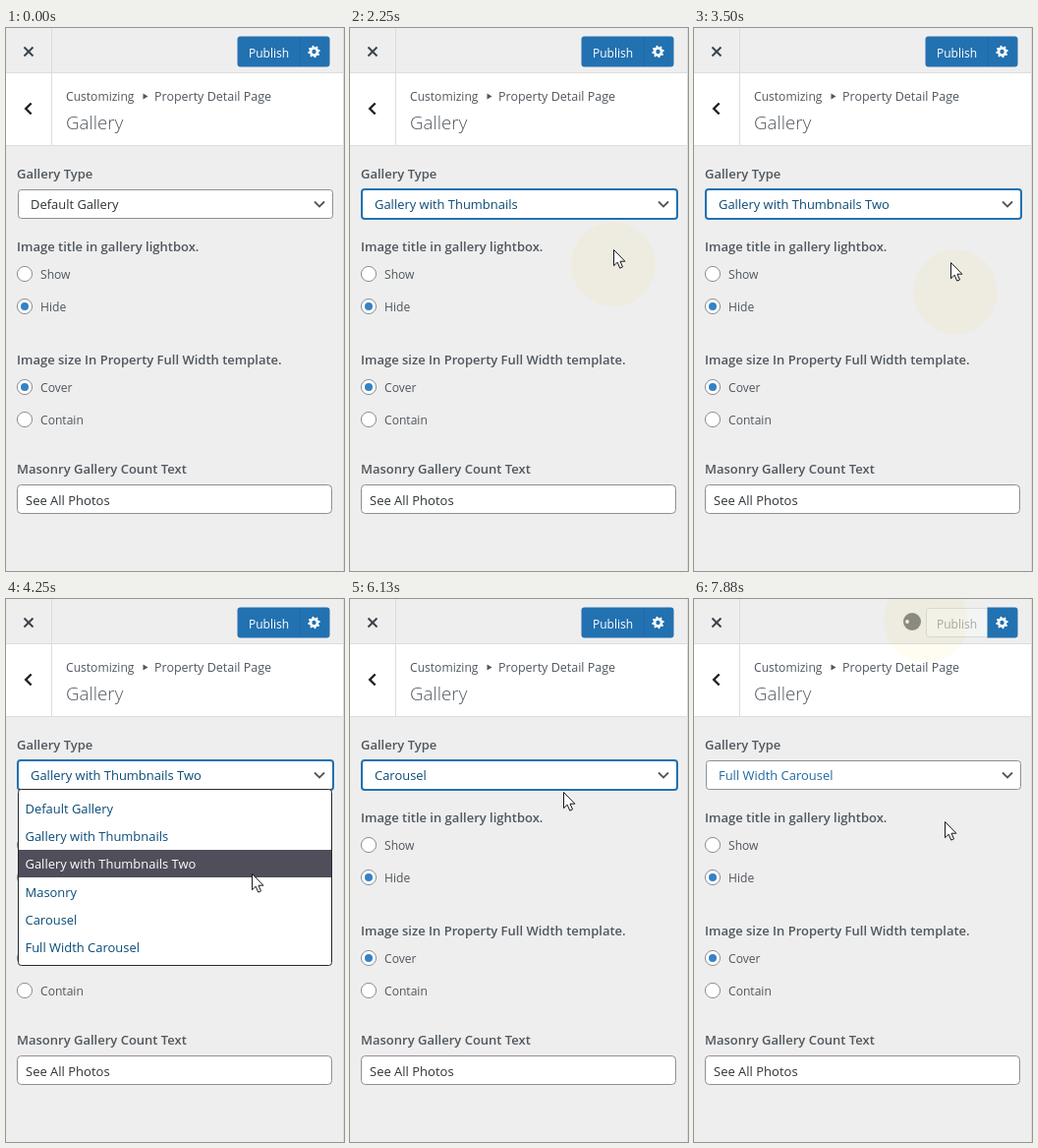
An HTML page with a canvas that plays this animation: 344 px wide and 552 px high, repeating every 8 s.

```html
<!DOCTYPE html>
<html lang="en">
<head>
<meta charset="utf-8">
<title>Gallery settings</title>
<style>
html, body { margin: 0; width: 100%; height: 100%; overflow: hidden; background: #eee; }
canvas { display: block; }
</style>
</head>
<body>
<canvas id="stage" width="344" height="552"></canvas>
<script>
const c = document.getElementById('stage').getContext('2d');
const LOOP = 8000, STEP = 125, GLOW = 375, ROW = 28.2;
const BLUE = '#2271b1', INK = '#2c3338', LABEL = '#50575e', DEEP = '#0a4b78', GREY = '#8c8f94';
const options = ['Default Gallery', 'Gallery with Thumbnails', 'Gallery with Thumbnails Two',
  'Masonry', 'Carousel', 'Full Width Carousel'];

// Clicks in order; a number picks that option
const clicks = [
  { at: 1125, x: 271, on: 'select' }, { at: 2000, x: 268, on: 1 },
  { at: 2750, x: 267, on: 'select' }, { at: 3250, x: 266, on: 2 },
  { at: 3875, x: 253, on: 'select' }, { at: 4375, x: 250, on: 3 },
  { at: 5000, x: 220, on: 'select' }, { at: 5625, x: 217, on: 4 },
  { at: 6250, x: 217, on: 'select' }, { at: 6875, x: 226, on: 5 },
  { at: 7625, x: 236, on: 'publish' }
];
const heights = { select: 181, publish: 22 };
for (const k of clicks) k.y = heights[k.on] ?? 212 + ROW * k.on;

// The pointer eases from one click to the next
const stops = [{ at: 250, x: 262, y: 505 }, ...clicks, { at: 7875, x: 255, y: 226 }];

function pointer(t) {
  if (t < stops[0].at) return null;
  const i = Math.max(1, stops.findIndex(s => s.at >= t));
  const a = stops[i - 1], b = stops[i];
  const k = (t - a.at) / (b.at - a.at), e = k * k * (3 - 2 * k);
  return { x: a.x + (b.x - a.x) * e, y: a.y + (b.y - a.y) * e };
}

function stateAt(t) {
  const done = clicks.filter(k => k.at <= t);
  const last = done.at(-1);
  const age = last ? t - last.at : Infinity;
  return {
    last, age,
    picked: done.findLast(k => k.on > 0)?.on ?? 0,
    open: last?.on === 'select',
    focus: !!last && last.on !== 'publish',
    saving: last?.on === 'publish' && age >= STEP
  };
}

function text(str, x, y, size, color, weight = 400) {
  c.font = `${weight} ${size}px "Open Sans", "Noto Sans", sans-serif`;
  c.fillStyle = color;
  c.fillText(str, x, y);
}

function rect(x, y, w, h, color) {
  c.fillStyle = color;
  c.fillRect(x, y, w, h);
}

function box(x, y, w, h, r, fill, stroke, line = 1) {
  c.beginPath();
  c.roundRect(x, y, w, h, r);
  c.fillStyle = fill;
  c.fill();
  if (stroke) { c.strokeStyle = stroke; c.lineWidth = line; c.stroke(); }
}

function disc(x, y, r, fill, stroke) {
  c.beginPath();
  c.arc(x, y, r, 0, Math.PI * 2);
  c.fillStyle = fill;
  c.fill();
  if (stroke) { c.strokeStyle = stroke; c.lineWidth = 1; c.stroke(); }
}

function poly(points, color, width) {
  c.beginPath();
  points.forEach(([x, y]) => c.lineTo(x, y));
  c.strokeStyle = color;
  c.lineWidth = width;
  c.stroke();
}

function gear(x, y) {
  c.beginPath();
  for (let i = 0; i < 32; i++) {
    const a = (i - 1.5) * Math.PI / 16, r = i % 4 < 2 ? 6.3 : 4.7;
    c.lineTo(x + r * Math.cos(a), y + r * Math.sin(a));
  }
  c.fillStyle = '#fff';
  c.fill();
  disc(x, y, 2.2, BLUE);
}

function radio(y, label, on) {
  disc(19, y, 7.6, '#fff', GREY);
  if (on) disc(19, y, 4, '#3582c4');
  text(label, 35, y + 5, 12.1, LABEL);
}

function header(s) {
  rect(0, 45, 344, 1, '#ddd');
  rect(0, 46, 343, 73, '#fff');
  rect(0, 119, 344, 1, '#ddd');
  rect(46, 0, 1, 119, '#ddd');
  poly([[18.5, 19.5], [27.5, 28.5]], '#3c434a', 2);
  poly([[27.5, 19.5], [18.5, 28.5]], '#3c434a', 2);
  poly([[25.7, 76.5], [20.2, 82], [25.7, 87.5]], '#1d2327', 2.4);
  text('Customizing', 61, 74, 12.1, LABEL);
  c.beginPath();
  c.moveTo(139.5, 66.5); c.lineTo(144.5, 69.5); c.lineTo(139.5, 72.5);
  c.fillStyle = LABEL;
  c.fill();
  text('Property Detail Page', 151, 74, 12.5, LABEL);
  text('Gallery', 61, 103, 18.8, LABEL, 300);

  if (s.saving) {
    const a = Math.PI + (s.age - 250) / 1000 * Math.PI * 2;
    disc(222, 23, 9, '#8b8b86');
    disc(222 + 5 * Math.cos(a), 23 + 5 * Math.sin(a), 1.9, '#f4f4ee');
    box(236.5, 9.5, 63, 29, [3, 0, 0, 3], '#f3f4f4', '#d9dadc');
    box(298.5, 8.5, 31, 31, [0, 3, 3, 0], BLUE);
  } else {
    box(235.5, 8.5, 94, 31, 3, BLUE);
    rect(299, 9, 1, 30, '#1f69a6');
  }
  text('Publish', 247, 30, 12, s.saving ? '#a7aaad' : '#fff');
  gear(313.5, 24);
}

function form(s, hover) {
  text('Gallery Type', 11, 153, 13, LABEL, 600);
  const ring = s.focus && !(s.open && s.age < STEP);
  if (ring) box(12, 164, 321, 30, 3, '#fff', BLUE, 2);
  else box(12.5, 164.5, 320, 29, 3, '#fff', GREY);
  const color = s.focus ? DEEP : hover || s.saving ? '#1f6aa5' : INK;
  text(options[s.picked], 25, 184, 12.95, color);
  poly([[314, 176.5], [319, 181.5], [324, 176.5]], LABEL, 1.8);

  text('Image title in gallery lightbox.', 11, 227, 13, LABEL, 600);
  radio(250, 'Show', false);
  radio(283, 'Hide', true);
  text('Image size In Property Full Width template.', 11, 342, 13, LABEL, 600);
  radio(365, 'Cover', true);
  radio(398, 'Contain', false);
  text('Masonry Gallery Count Text', 11, 453, 13, LABEL, 600);
  box(11.5, 464.5, 320, 29, 4, '#fff', GREY);
  text('See All Photos', 20, 485, 13, INK);
}

function menu(s, p) {
  const top = 198.4, under = Math.floor((p.y - top) / ROW);
  const lit = options[under] ? under : s.picked;
  box(12.5, 193.5, 319, 179, 3, '#fff', '#24272b');
  options.forEach((name, i) => {
    if (i === lit) rect(13, Math.round(top + ROW * i), 318, 28, '#4f4e5a');
    text(name, 19.5, Math.round(218 + ROW * i), 12.95, i === lit ? '#fff' : DEEP);
  });
}

function glow({ last, age }) {
  if (age >= GLOW) return;
  const k = age / GLOW;
  c.save();
  c.globalCompositeOperation = 'multiply';
  c.globalAlpha = 0.72 * (1 - k) ** 2;
  disc(last.x, last.y, 25 + 27 * k, '#f6e45c');
  c.restore();
}

const arrow = new Path2D('M0 0V16.2L3.7 12.7L6.2 18.6L9 17.4L6.5 11.7H11.4Z');
const hand = new Path2D('M-1.8 1.6C-1.8-.6 1.8-.6 1.8 1.6V8C2.4 6.8 5 7 5.2 8.6' +
  'C6 7.6 8.2 8 8.4 9.6C9.4 8.8 11 9.6 11 11.2V16C11 18.4 9.4 20 9.2 22.8H-.6' +
  'C-.8 20.4-4 17.6-5.6 14.2C-6.4 12.2-4.2 11.2-3 12.6L-1.8 14Z');

function cursor(p, link) {
  const shape = link ? hand : arrow, edge = '#16181c';
  c.save();
  c.translate(Math.round(p.x) + 0.5, Math.round(p.y) + 0.5);
  c.lineJoin = 'round';
  c.lineWidth = 1;
  c.fillStyle = '#fff';
  c.strokeStyle = edge;
  c.fill(shape);
  c.stroke(shape);
  if (link) for (let i = 0; i < 3; i++) {
    poly([[1.8 + 3.3 * i, 8 + i], [1.8 + 3.3 * i, 12 + i / 2]], edge, 1);
  }
  c.restore();
}

function draw(t) {
  const s = stateAt(t), p = pointer(t);
  const inside = (x, y, w, h) => !!p && p.x >= x && p.x < x + w && p.y >= y && p.y < y + h;
  const onSelect = inside(12, 164, 321, 30);
  rect(0, 0, 344, 552, '#eee');
  rect(343, 0, 1, 552, '#ddd');
  header(s);
  form(s, onSelect);
  if (s.open) menu(s, p);
  glow(s);
  if (p) cursor(p, onSelect || inside(236, 9, 93, 30));
}

const start = performance.now();
function tick() {
  const t = (performance.now() - start) % LOOP;
  draw(Math.min(LOOP - STEP, Math.floor((t + 5) / STEP) * STEP));
  requestAnimationFrame(tick);
}
tick();
</script>
</body>
</html>
```
